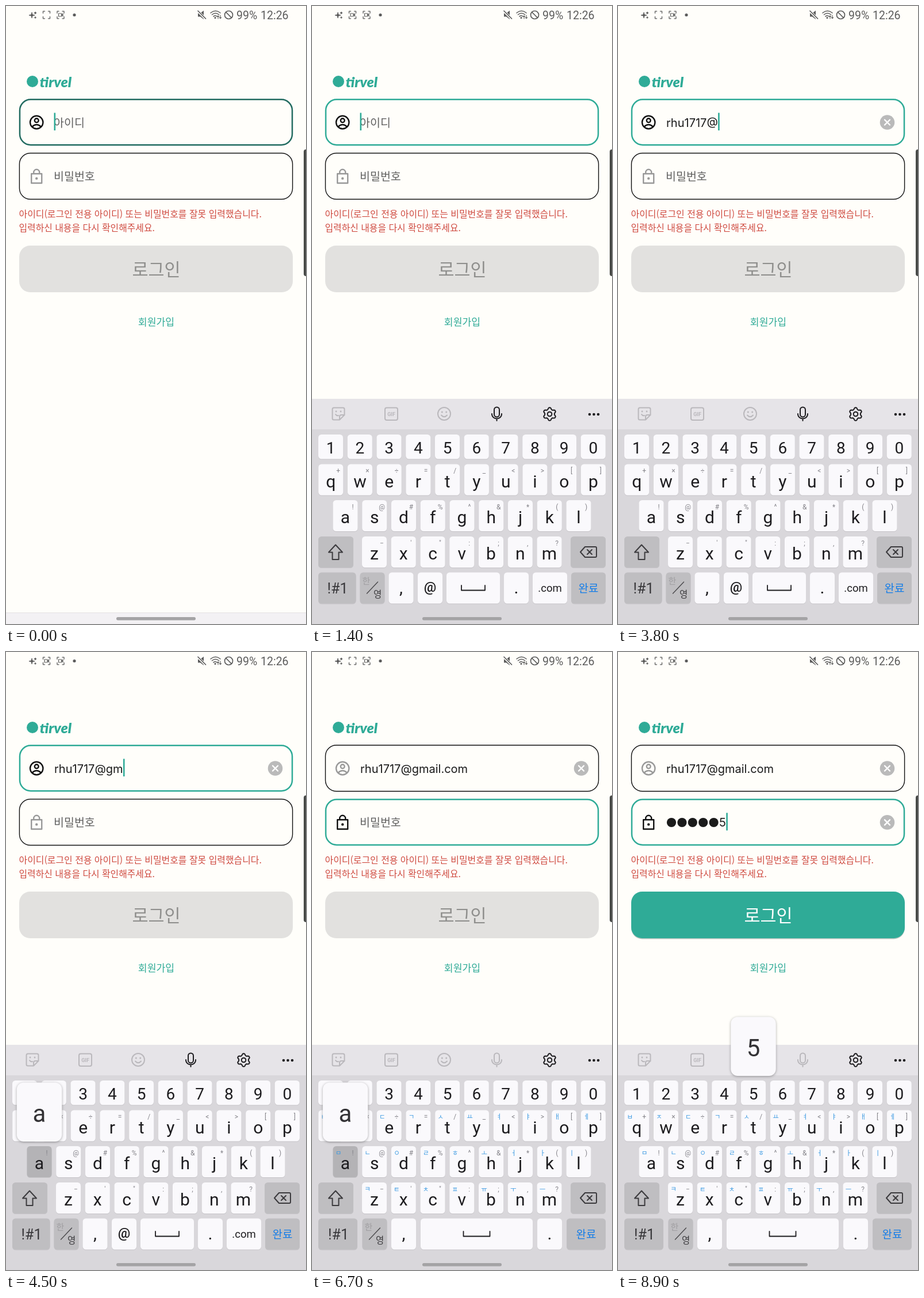
Recreate the animation shown at these times as an HTML page. Size 522 by 1073 pixels, loop 9000 ms.

```html
<!DOCTYPE html>
<html lang="ko">
<head>
<meta charset="utf-8">
<style>
  html, body { margin: 0; width: 100%; height: 100%; overflow: hidden; background: #fffefa; }
  svg { display: block; width: 522px; height: 1073px; }
  text { font-family: Roboto, "Noto Sans CJK KR", sans-serif; white-space: pre; }
  .ko { font-family: "Noto Sans CJK KR", "Noto Sans CJK", sans-serif; }
  .entry { font-family: Inter, sans-serif; font-size: 20px; fill: #1b1b1b; }
  .line { fill: none; stroke-linecap: round; stroke-linejoin: round; }
</style>
</head>
<body>
<svg id="stage" viewBox="0 0 522 1073"></svg>
<script>
const LOOP = 9000, TEAL = [47, 171, 151], BLACK = [17, 17, 17], GREY = [153, 153, 153];
const KEY = '#faf9fc', DARK_KEY = '#bfbec1', PRESSED = '#b4b3b6', INK = '#1d1c1f';
const KEYBOARD_HEIGHT = 391, FOCUS_ID = -100, FOCUS_PW = 6050, SWAP = 6200;
const FIELD_TOP = { id: 161, pw: 254.8 };

// [time a key is released, label]
const idPresses = [[1600, 'r'], [1800, 'h'], [1980, 'u'], [2150, '1'], [2500, '7'], [2700, '1'], [2900, '7'],
  [3600, '@'], [4150, 'g'], [4400, 'm'], [4600, 'a'], [4800, 'i'], [5000, 'l'], [5300, '.com']];
const pwPresses = [[6800, 'a'], [7500, 'b'], [8100, '2'], [8350, '3'], [8600, '4'], [8870, '5']];
const presses = [...idPresses, ...pwPresses];

const clamp = v => Math.max(0, Math.min(1, v));
const rgb = (a, b, k) => `rgb(${a.map((v, i) => Math.round(v + (b[i] - v) * k))})`;
const esc = s => s.replace(/&/g, '&amp;').replace(/</g, '&lt;');
const rect = (x, y, w, h, r, fill, more = '') =>
  `<rect x="${x}" y="${y}" width="${w}" height="${h}" rx="${r}" fill="${fill}" ${more}/>`;
const circle = (x, y, r, fill, more = '') => `<circle cx="${x}" cy="${y}" r="${r}" fill="${fill}" ${more}/>`;
const text = (x, y, size, fill, s, more = '') =>
  `<text x="${x}" y="${y}" font-size="${size}" fill="${fill}" ${more}>${esc(s)}</text>`;
const mid = (x, y, size, fill, s, more = '') => text(x, y, size, fill, s, 'text-anchor="middle" ' + more);
const line = (d, color, width = 2, more = '') =>
  `<path class="line" d="${d}" stroke="${color}" stroke-width="${width}" ${more}/>`;
const at = (x, y, body, more = '') => `<g transform="translate(${x} ${y})" ${more}>${body}</g>`;
const KO = 'class="ko"';

function statusBar() {
  const c = '#5c5c5c';
  const corners = line('M-6-3V-6.3H-3M3-6.3H6V-3M6 3V6.3H3M-3 6.3H-6V3', c, 1.3);
  const camera = line('M-3.5-2.5H1.5V2.5H-3.5ZM1.5 0L4-2V2Z', c, 1.2);
  const star = (x, y, r) => `<path d="M${x} ${y - r}Q${x} ${y} ${x + r} ${y}Q${x} ${y} ${x} ${y + r}Q${x} ${y} ${x - r} ${y}Q${x} ${y} ${x} ${y - r}" fill="${c}" stroke="${c}"/>`;
  return star(45, 16, 5) + star(51, 12, 2) + star(51, 20, 1.5)
    + at(70.5, 15.5, corners) + at(70.5, 15.5, camera, 'id="camera"')
    + at(95, 15.5, corners + camera) + circle(119, 15.5, 2.6, c)
    + `<path d="M334 12.5H338L344 8V23L338 18.5H334Z" fill="${c}"/>`
    + line('M334 9L348 23', '#fffefa', 4) + line('M334 8.5L347.5 22', c, 1.7)
    + line('M356 12Q364.5 5 373 12M358.5 15Q364.5 10 370.5 15M361 18Q364.5 15.5 367 18', c, 1.6)
    + circle(364, 20.5, 1.6, c)
    + line('M369 22V17M367.5 18.5L369 17L370.5 18.5M373 16V21.5M371.5 20L373 21.5L374.5 20', c, 1.1)
    + circle(387.5, 15.5, 7, 'none', `stroke="${c}" stroke-width="1.7"`) + line('M382.5 10.5L392.5 20.5', c, 1.7)
    + text(401, 23, 19.5, c, '99%') + text(443, 23, 19.5, c, '12:26');
}

function field(name, hint, icon) {
  const y = FIELD_TOP[name];
  return rect(0, 0, 0, 0, 19, 'none', `id="${name}Box"`)
    + at(53.2, y + 41, icon, `id="${name}Icon" fill="none" stroke-width="2.4"`)
    + text(83, y + 48.5, 19.5, '#5f5f5f', hint, `${KO} id="${name}Hint"`)
    + `<g id="${name}Dots"></g><text class="entry" id="${name}Text" y="${y + 48.5}"></text>`
    + rect(0, y + 24.5, 2.6, 30.5, 0, rgb(TEAL, TEAL, 0), `id="${name}Caret"`)
    + at(468.5, y + 41, circle(0, 0, 12.8, '#bababa') + line('M-4.5-4.5L4.5 4.5M4.5-4.5L-4.5 4.5', '#fff', 2.4), `id="${name}Clear"`);
}

function page() {
  const person = circle(0, 0, 11.2, 'none') + circle(0, -3.3, 3.4, 'none')
    + '<path d="M-7.6 7.6Q-4 4 0 4T7.6 7.6"/>';
  const lock = '<path d="M-9-4.5H9V11.7H-9ZM-5-4.5V-7A5 5 0 0 1 5-7V-4.5" stroke-linejoin="round"/>'
    + circle(0, 3.6, 1.2, 'none', 'stroke-width="2"');
  return statusBar()
    + circle(46, 131, 10, '#2fab97')
    + text(58.5, 141, 25, '#2fab97', 'tirvel', 'style="font:italic 900 25px Lato,sans-serif"')
    + field('id', '아이디', person) + field('pw', '비밀번호', lock)
    + text(22.5, 367, 15.92, '#cf4a40', '아이디(로그인 전용 아이디) 또는 비밀번호를 잘못 입력했습니다.', KO)
    + text(22.5, 390.5, 15.85, '#cf4a40', '입력하신 내용을 다시 확인해주세요.', KO)
    + rect(23, 417.5, 476, 81, 19, '#b9c6c1', 'id="loginShadow"')
    + rect(23, 416, 476, 81, 19, '#e2e1df', 'id="login"')
    + mid(261.5, 468.5, 30.5, '#8f8f8d', '로그인', KO + ' id="loginText"')
    + mid(261.5, 554.5, 17.2, '#2fab97', '회원가입', KO + ' font-weight="500"')
    + rect(518, 249, 12, 220, 4, '#484a48')
    + rect(0, 1053, 522, 20, 0, '#f3f1f4') + rect(0, 1053, 522, 1, 0, '#e3e1e3');
}

const layouts = [];

function keyboard(email) {
  const keys = {}, id = email ? 'email' : 'korean', dim = '#bab8bc';
  layouts.push(keys);
  const key = (label, x, w, y, h, fill = KEY) => {
    keys[label] = { id: id + Object.keys(keys).length, x: x + w / 2, y };
    return rect(x, y + 1, w, h, 5.5, '#c6c4c8') + rect(x, y, w, h, 5.5, fill, `id="${keys[label].id}"`);
  };
  const row = (letters, first, y, hints, jamo) => [...letters].map((c, i) => {
    const x = first + 50.75 * i;
    return key(c, x - 21.5, 43, y, 54) + mid(x, y + 40, 30, INK, c)
      + mid(x + 13, y + 15.5, 12, '#85848a', hints[i])
      + (email ? '' : mid(x - 12, y + 15.5, 11.5, '#3c9ae2', jamo[i], KO));
  }).join('');

  const gear = Array.from({ length: 48 }, (_, i) => {
    const a = i * Math.PI / 24, r = 9.8 + 1.5 * Math.tanh(-2 * Math.cos(6 * a));
    return `${(r * Math.cos(a)).toFixed(2)} ${(r * Math.sin(a)).toFixed(2)}`;
  });
  const smile = circle(-3.7, -3, 1.5, dim) + circle(3.7, -3, 1.5, dim) + line('M-5 2.5Q0 8 5 2.5', dim);
  const toolbar = at(46, 708, line('M-8-10.5H8Q10.5-10.5 10.5-8V2L2 10.5H-8Q-10.5 10.5-10.5 8V-8Q-10.5-10.5-8-10.5M10.5 2H5Q2 2 2 5V10.5', dim)
      + circle(-4, -4, 1.4, dim) + circle(4, -4, 1.4, dim) + line('M-5 1Q-3 4 0 3', dim))
    + rect(127, 697.5, 22, 21.5, 3, 'none', `stroke="${dim}" stroke-width="2"`)
    + mid(138, 712, 9, dim, 'GIF', 'font-weight="700"')
    + at(230, 708, circle(0, 0, 11, 'none', `stroke="${dim}" stroke-width="2"`) + smile)
    + at(321.5, 708, line('M-4.5-7A4.5 4.5 0 0 1 4.5-7V1A4.5 4.5 0 0 1-4.5 1ZM-8.5 0V1A8.5 7.5 0 0 0 8.5 1V0M0 8.5V12', email ? INK : dim))
    + at(413.5, 708.5, line(`M${gear.join('L')}Z`, INK, 2) + circle(0, 0, 3.8, 'none', `stroke="${INK}" stroke-width="2"`))
    + [483, 490.5, 498].map(x => circle(x, 709, 2.3, INK)).join('');

  const digits = [...'1234567890'].map((c, i) =>
    key(c, 11 + 50.75 * i, 43, 744, 42.5) + mid(32.5 + 50.75 * i, 776.5, 28, INK, c)).join('');
  const letters = row('qwertyuiop', 32.7, 795.5, '+×÷=/_<>[]', 'ㅂㅈㄷㄱㅅㅛㅕㅑㅐㅔ')
    + row('asdfghjkl', 58, 858, '!@#%^&*()', 'ㅁㄴㅇㄹㅎㅗㅓㅏㅣ')
    + row('zxcvbnm', 108.5, 921, '−\'":;,?', 'ㅋㅌㅊㅍㅠㅜㅡ');
  const side = key('shift', 11, 61, 921, 54, DARK_KEY)
    + line('M41 935.5L53 948.5H46.5V961H35.5V948.5H29Z', '#3c3b3e')
    + key('delete', 450, 61, 921, 54, DARK_KEY)
    + line('M475 939H493Q495 939 495 941V955Q495 957 493 957H475L467 948ZM479 944L487 952M487 944L479 952', '#3c3b3e');

  const bottom = (label, x, right, fill) => key(label, x, right - x, 983.5, 54, fill);
  const langX = email ? 83.5 : 87.5, spaceX = email ? 280.5 : 286.5, half = email ? 20.5 : 23;
  const commaX = email ? 155 : 159.5, dotX = email ? 355.5 : 413.5;
  const lowerRow = bottom('!#1', 11, email ? 76.5 : 79, DARK_KEY)
    + mid(email ? 44.5 : 46, 1019.5, 25, '#38373a', '!#1')
    + bottom('lang', langX, langX + 43, DARK_KEY)
    + text(langX + 4, 1004, 15, '#a09fa2', '한', KO) + line(`M${langX + 12} 1020L${langX + 31} 1000`, '#4a494c', 1.4)
    + text(langX + 23.5, 1026.5, 15.5, '#38373a', '영', KO)
    + bottom(',', commaX - 21.5, commaX + 21.5) + mid(commaX, 1020, 30, INK, ',')
    + (email ? bottom('@', 184, 227) + mid(205.5, 1017, 24, INK, '@', 'font-weight="500"') : '')
    + bottom('space', email ? 234 : 189, email ? 327 : 384)
    + line(`M${spaceX - half} 1006V1014.5H${spaceX + half}V1006`, INK, 1.8)
    + bottom('.', dotX - 21.5, dotX + 21.5) + mid(dotX, 1020, 30, INK, '.')
    + (email ? bottom('.com', 384, 444) + mid(414, 1017, 18.5, INK, '.com') : '')
    + bottom('done', email ? 451 : 443, 511, DARK_KEY)
    + mid(email ? 481 : 477, 1017.5, 19, '#147de8', '완료', KO);

  return `<g id="${id}">${rect(0, 682, 522, 54, 0, '#e6e4e8')}${rect(0, 735, 522, 338, 0, '#d9d7db')}`
    + toolbar + digits + letters + side + lowerRow + '</g>';
}

document.getElementById('stage').innerHTML = page()
  + `<g id="keyboard">${keyboard(true)}${keyboard(false)}</g>`
  + rect(192, 1061, 138, 5.5, 2.7, '#a4a3a5')
  + `<g id="popup">${rect(0, 0, 0, 102.5, 12, KEY, 'id="bubble" style="filter:drop-shadow(0 1px 2px #0005)"')}`
  + mid(0, 0, 42, '#333235', '', 'id="bubbleText"') + '</g>';

const $ = id => document.getElementById(id);
const set = (id, attrs) => Object.entries(attrs).forEach(([k, v]) => $(id).setAttribute(k, v));
const show = (id, on) => { $(id).style.display = on ? '' : 'none'; };
const typed = (list, t) => list.filter(p => p[0] <= t);

function drawField(name, t, list, focus, focusedAt, secret) {
  const done = typed(list, t), value = done.map(p => p[1]).join('');
  const last = done.length ? done[done.length - 1][0] : -Infinity;
  const hidden = secret ? Math.max(0, value.length - (t - last < 1500 ? 1 : 0)) : 0;
  const start = 84 + 18.4 * hidden, label = $(name + 'Text');
  label.textContent = value.slice(hidden);
  label.setAttribute('x', start);
  $(name + 'Dots').innerHTML = Array.from({ length: hidden }, (_, i) => circle(93 + 18.4 * i, 296, 8.1, '#1b1b1b')).join('');
  show(name + 'Hint', !value);
  show(name + 'Clear', value);

  // The border is drawn inside the field's outer edge.
  const border = focus > 0 ? 2.5 : 1.4;
  set(name + 'Box', {
    x: 22.7 + border / 2, y: FIELD_TOP[name] + border / 2, width: 476.6 - border, height: 81.4 - border,
    stroke: rgb(BLACK, TEAL, focus), 'stroke-width': border
  });
  set(name + 'Icon', { stroke: rgb(GREY, BLACK, focus > 0 ? 1 : 0) });
  const since = t - Math.max(last, focusedAt + 100);
  show(name + 'Caret', focus > 0.1 && (since < 0 || since % 1000 < 500));
  set(name + 'Caret', { x: start + (value ? label.getComputedTextLength() + 0.4 : -0.5) });
}

function drawPopup(t) {
  const keys = layouts[t < SWAP ? 0 : 1];
  const active = presses.find(([time]) => t >= time - 100 && t < time + 60);
  show('popup', active);
  for (const layout of layouts)
    for (const [, label] of presses) if (layout[label]) set(layout[label].id, { fill: KEY });
  if (!active) return;
  const [time, label] = active, key = keys[label], wide = label === '.com';
  if (t < time) set(key.id, { fill: PRESSED });
  const w = wide ? 117.5 : 78.5, x = Math.max(11, Math.min(511 - w, key.x - w / 2)), y = key.y - 110.5;
  set('bubble', { x, y, width: w });
  set('bubbleText', { x: x + w / 2, y: y + (wide ? 61 : 68), 'font-size': wide ? 25 : 42 });
  $('bubbleText').textContent = label;
}

function draw(t) {
  const toPw = clamp((t - FOCUS_PW) / 170);
  drawField('id', t, idPresses, clamp((t - FOCUS_ID) / 170) * (1 - toPw), FOCUS_ID, false);
  drawField('pw', t, pwPresses, toPw, FOCUS_PW, true);

  const ready = typed(pwPresses, t).length > 0;
  set('login', { fill: ready ? '#2fab97' : '#e2e1df' });
  set('loginText', { fill: ready ? '#fff' : '#8f8f8d' });
  show('loginShadow', ready);

  show('camera', t % 1000 >= 100 && t % 1000 < 600);
  const drop = (1 - clamp((t - 300) / 300)) ** 3;
  show('keyboard', drop < 1);
  set('keyboard', { transform: `translate(0 ${drop * KEYBOARD_HEIGHT})` });
  show('email', t < SWAP);
  show('korean', t >= SWAP);
  drawPopup(t);
}

function tick() {
  draw(performance.now() % LOOP);
  requestAnimationFrame(tick);
}
tick();
</script>
</body>
</html>
```
